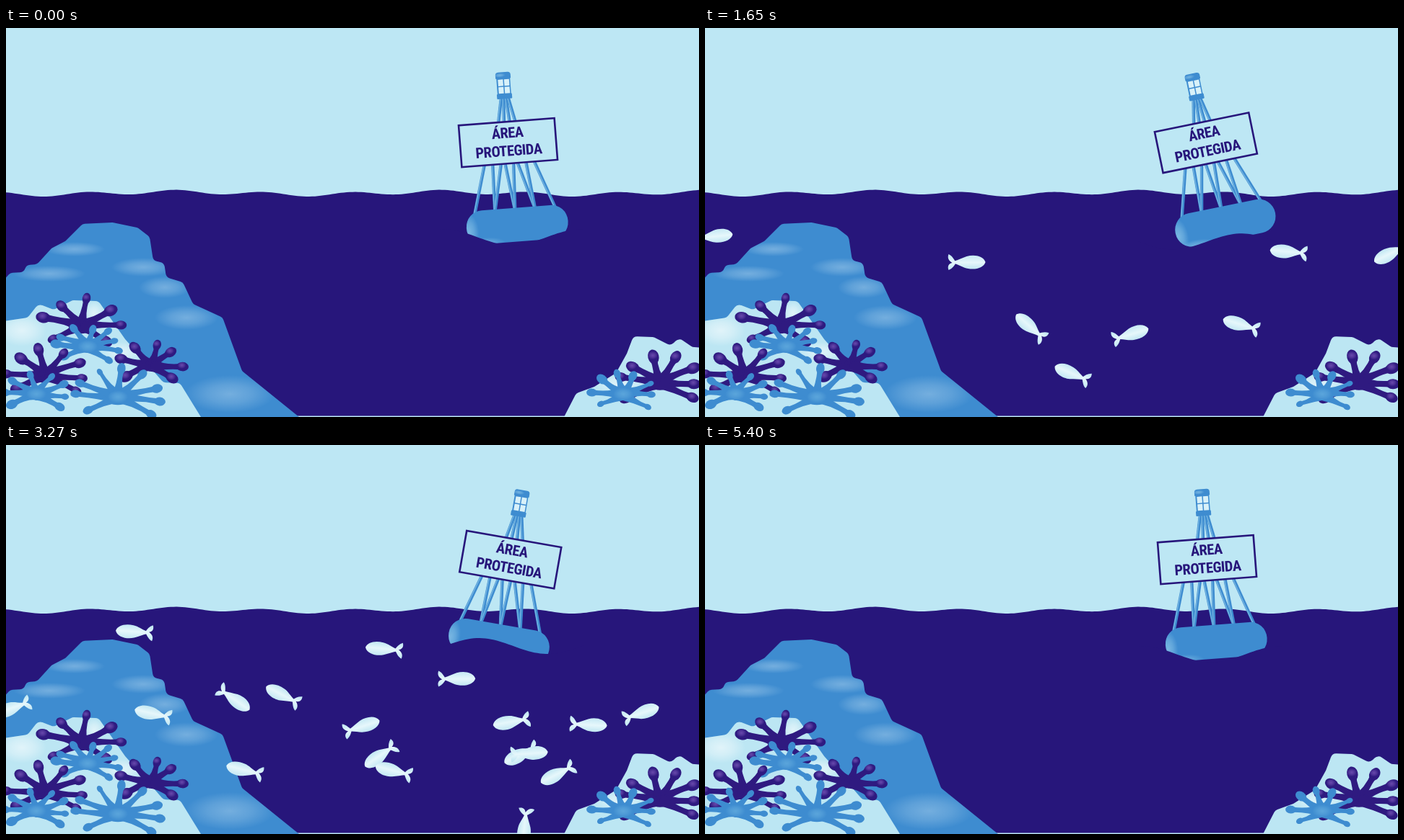
These frames come from a looping animation (960x540 px, 5430 ms). An HTML page with a canvas:

```html
<!DOCTYPE html>
<html lang="es">
<head>
<meta charset="utf-8">
<title>Área protegida</title>
<style>
html, body { margin: 0; width: 100%; height: 100%; overflow: hidden; background: #bde7f4; }
canvas { display: block; }
</style>
</head>
<body>
<canvas id="stage" width="960" height="540"></canvas>
<script>
const SKY = '#bde7f4', SEA = '#27167b', BLUE = '#3e8cd0', LIGHT = '#bce6f3';
const { sin, cos, exp, PI } = Math;
const ctx = document.getElementById('stage').getContext('2d');
const backdrop = document.createElement('canvas');
backdrop.width = 960;
backdrop.height = 540;

function glow(c, x, y, rx, ry, rgb, alpha) {
  c.save();
  c.translate(x, y);
  c.scale(rx, ry);
  const g = c.createRadialGradient(0, 0, 0, 0, 0, 1);
  g.addColorStop(0, `rgba(${rgb},${alpha})`);
  g.addColorStop(.5, `rgba(${rgb},${alpha * .6})`);
  g.addColorStop(1, `rgba(${rgb},0)`);
  c.fillStyle = g;
  c.fillRect(-1, -1, 2, 2);
  c.restore();
}

// Rock outline with rounded corners; spots are pale smudges inside it
function rock(c, color, outline, rgb, spots) {
  c.save();
  c.beginPath();
  outline.forEach(([x, y], i) => {
    const [nx, ny] = outline[i + 1] || [x, y];
    c.arcTo(x, y, nx, ny, 8);
  });
  c.closePath();
  c.fillStyle = color;
  c.fill();
  c.clip();
  for (const [x, y, rx, ry] of spots) glow(c, x, y, rx, ry, rgb, .55);
  c.restore();
}

// A fan of curved arms with club-shaped tips
function coral(c, x, y, rx, ry, arms, dark) {
  let seed = x * 7 + y;
  const random = () => (seed = seed * 16807 % 2147483647) / 2147483647;
  const color = dark ? '#2f1a80' : BLUE;
  c.fillStyle = color;
  c.beginPath();
  c.ellipse(x, y, rx * .3, ry * .28, 0, 0, 7);
  c.fill();
  for (let i = 0; i < arms; i++) {
    const angle = (-215 + 250 * i / (arms - 1) + 12 * random()) * PI / 180;
    const reach = i % 2 ? .95 : .8 + .2 * random();
    const r = (dark ? 6 : 4) + 3 * random();
    const dx = rx * reach * cos(angle), dy = ry * reach * sin(angle);
    const len = Math.hypot(dx, dy), nx = -dy / len, ny = dx / len;
    const bend = 6 * (random() - .5);
    const at = (f, w) => [x + dx * f + nx * w, y + dy * f + ny * w];
    c.fillStyle = color;
    c.beginPath();
    c.moveTo(...at(0, 9));
    c.quadraticCurveTo(...at(.45, bend + 2), ...at(.95, r * .6));
    c.lineTo(...at(.95, -r * .6));
    c.quadraticCurveTo(...at(.45, bend - 2), ...at(0, -9));
    c.fill();
    c.beginPath();
    c.ellipse(x + dx, y + dy, r * 1.2, r * .9, Math.atan2(dy, dx), 0, 7);
    c.fill();
    if (dark) glow(c, x + dx - 1, y + dy - 2, r * .85, r * .7, '128,92,190', .7);
  }
  if (!dark) glow(c, x, y, 14, 9, '120,190,230', .5);
}

function drawBackdrop(c) {
  c.fillStyle = SKY;
  c.fillRect(0, 0, 960, 540);

  c.beginPath();
  c.moveTo(0, 538.5);
  for (let x = 0; x <= 960; x += 4)
    c.lineTo(x, 229.3 - 2.7 * cos((x - 235) * PI / 61) - 2 * cos((x - 235) * PI / 185));
  c.lineTo(960, 538.5);
  c.fillStyle = SEA;
  c.fill();

  rock(c, BLUE, [[-9, 540], [-9, 356], [6, 340], [25, 339], [28, 329], [43, 328], [63, 306], [82, 296], [106, 272],
    [148, 270], [182, 277], [199, 290], [204, 323], [219, 326], [222, 346], [245, 353], [259, 383],
    [300, 402], [327, 476], [406, 540]], '160,202,234',
    [[95, 307, 42, 10], [60, 341, 50, 11], [190, 332, 44, 13], [220, 360, 36, 15], [250, 402, 44, 17], [310, 508, 62, 26]]);
  rock(c, LIGHT, [[-9, 540], [-9, 408], [30, 402], [45, 383], [66, 391], [92, 378], [128, 379],
    [165, 432], [198, 469], [218, 492], [241, 493], [270, 540]], '255,255,255',
    [[22, 420, 34, 22], [160, 450, 30, 14], [122, 396, 14, 16]]);
  rock(c, LIGHT, [[773, 540], [790, 507], [815, 498], [845, 479], [860, 452], [869, 428], [897, 429],
    [921, 441], [932, 430], [951, 443], [969, 444], [969, 540]], '255,255,255', [[850, 495, 34, 14]]);

  coral(c, 104, 413, 58, 40, 7, true);
  coral(c, 113, 442, 46, 29, 9, false);
  coral(c, 201, 468, 46, 30, 7, true);
  coral(c, 54, 482, 57, 38, 8, true);
  coral(c, 155, 512, 62, 40, 9, false);
  coral(c, 42, 508, 46, 28, 8, false);
  coral(c, 906, 492, 58, 38, 8, true);
  coral(c, 855, 508, 46, 30, 8, false);
}

function line(x1, y1, x2, y2, width, color) {
  ctx.beginPath();
  ctx.moveTo(x1, y1);
  ctx.lineTo(x2, y2);
  ctx.lineWidth = width;
  ctx.strokeStyle = color;
  ctx.stroke();
}

function strut(x1, y1, x2, y2) {
  line(x1, y1, x2, y2, 4.4, BLUE);
  line(x1 - 1, y1, x2 - 1, y2, 1.4, '#74b5e1');
}

// Condensed lettering, sized so the longer word spans the sign
ctx.textAlign = 'center';
ctx.fontStretch = 'condensed';
ctx.letterSpacing = '-0.5px';
const font = size => `bold ${size}px "Roboto Condensed", Roboto, "Liberation Sans", sans-serif`;
ctx.font = font(20);
const signFont = font(20 * 92 / ctx.measureText('PROTEGIDA').width);

function drawBuoy(t) {
  const swing = t * 2 * PI / 2700;
  const angle = -2.4 + 13.1 * sin(swing - .09) - 1.8 * sin(2 * swing + .46);
  ctx.save();
  ctx.translate(697, 172);
  ctx.rotate(angle * PI / 180);
  ctx.translate(-697, -172);

  for (let i = 0; i < 4; i++) strut(692 + 3 * i, 95, 685 + 8 * i, 132);
  for (let i = 0; i < 5; i++) {
    const foot = 643 + 28 * i, top = 662 + 17 * i;
    if (i > 0) strut(top - 6 + 6 * (i > 3), 186, foot, 254);
    if (i < 4) strut(top + 6 - 6 * (i < 1), 186, foot, 254);
  }

  ctx.fillStyle = BLUE;
  ctx.beginPath();
  ctx.roundRect(686, 61, 21, 9, [4, 4, 1, 1]);
  ctx.roundRect(687, 69, 19, 25, 1);
  ctx.roundRect(686, 91, 21, 7, 1);
  ctx.fill();
  ctx.fillStyle = '#d8f1f9';
  for (const x of [689, 697.5]) for (const y of [71, 81.5]) ctx.fillRect(x, y, 7, 9);
  glow(ctx, 692, 65, 8, 3, '150,205,235', .6);

  ctx.fillStyle = BLUE;
  ctx.beginPath();
  ctx.roundRect(630, 250, 141, 47, 23);
  ctx.fill();
  ctx.save();
  ctx.clip();
  glow(ctx, 633, 279, 14, 26, '160,212,238', .6);
  glow(ctx, 654, 296, 28, 8, '150,205,235', .5);
  ctx.restore();

  ctx.fillStyle = SKY;
  ctx.strokeStyle = SEA;
  ctx.lineWidth = 2.6;
  ctx.fillRect(630, 130, 133, 58);
  ctx.strokeRect(630, 130, 133, 58);
  ctx.fillStyle = SEA;
  ctx.font = signFont;
  ctx.fillText('ÁREA', 696.5, 152.5);
  ctx.fillText('PROTEGIDA', 696.5, 177.5);
  ctx.restore();

  // Travelling swell that hides the underside of the float
  const crest = 618 + t * 380 / 5400 - 12 * cos(swing), level = 287 - .8 * angle;
  ctx.beginPath();
  ctx.moveTo(600, 330);
  for (let x = 600; x <= 800; x += 4)
    ctx.lineTo(x, level - 11 * cos((x - crest) * PI / 95));
  ctx.lineTo(800, 330);
  ctx.fillStyle = SEA;
  ctx.fill();
}

// Each fish darts in when its shoal joins, then cruises from x1, y1 to x2, y2 on a weaving course
const shoal = [];
function addShoal(join, leave, courses) {
  for (const [x1, y1, x2, y2, weave = 0] of courses) {
    const dart = 900 * Math.sign(x2 - x1);
    shoal.push(t => {
      const u = (t - leave) / (4050 - leave);
      return [
        x1 + (x2 - x1) * u - dart * exp((join - t) / 220),
        y1 + (y2 - y1) * u + weave * sin(PI * u)
      ];
    });
  }
}
addShoal(0, 1650, [
  [363, 325, 750, 324],
  [13, 289, 462, 478, -75],
  [590, 425, 911, 402, -25],
  [808, 311, 387, 270],
  [742, 412, 411, 529, -70],
  [508, 480, 57, 347, -20],
  [450, 415, 47, 273, -70],
  [950, 313, 600, 486]
]);
addShoal(1750, 2580, [
  [358, 435, 647, 340],
  [82, 338, -75, 396],
  [422, 476, 225, 424],
  [598, 468, 870, 461, -37],
  [645, 532, 413, 490, -60],
  [535, 465, 210, 308, -44],
  [928, 310, 441, 384, 40],
  [866, 403, 647, 518],
  [800, 400, 972, 340],
  [719, 490, 716, 575]
]);

const body = new Path2D('M26 0C23-9 10-11 0-8C-6-6-12-3-17-1.5V2C-10 4-5 8 2 9C14 11 24 7 26 0Z');
const tail = new Path2D('M-15 0C-18-4-20-9-25-11C-27-6-25-2-20 1C-25 2-27 6-25 11C-20 9-17 5-15 1Z');
const skin = ctx.createLinearGradient(0, -9, 0, 10);
skin.addColorStop(0, '#c6e9f4');
skin.addColorStop(.5, '#e6f7fb');
skin.addColorStop(1, '#bfe6f2');

function drawFish(at, t) {
  const [x, y] = at(t), [ax, ay] = at(t - 10);
  ctx.save();
  ctx.translate(x, y);
  ctx.rotate(Math.atan2(y - ay, x - ax));
  ctx.fillStyle = skin;
  ctx.fill(tail);
  ctx.fill(body);
  ctx.restore();
}

drawBackdrop(backdrop.getContext('2d'));
const start = performance.now();

function draw() {
  const elapsed = (performance.now() - start) % 5430;
  const t = Math.floor(elapsed / 30) * 30 % 5400;
  ctx.drawImage(backdrop, 0, 0);
  drawBuoy(t);
  for (const fish of shoal) drawFish(fish, t);
  requestAnimationFrame(draw);
}
draw();
</script>
</body>
</html>
```
